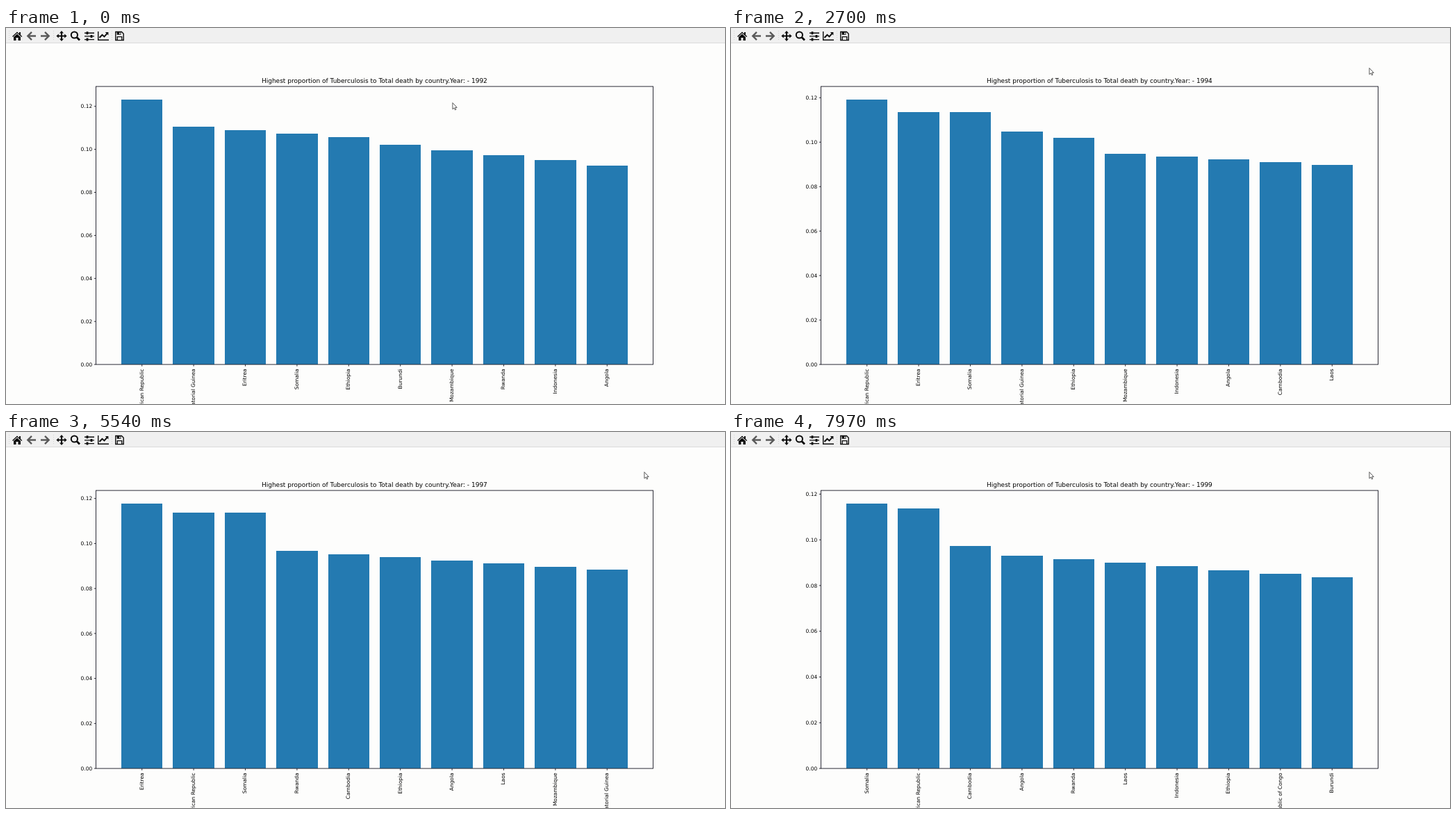
Animation of 1035 by 541 pixels, one loop 8 s. Source, as an HTML page:

```html
<!DOCTYPE html>
<html lang="en">
<head>
<meta charset="utf-8">
<title>Bar chart by year</title>
<style>
  html, body { margin: 0; width: 100%; height: 100%; overflow: hidden; background: #fdfdfc; }
  svg { display: block; width: 1035px; height: 541px; }
  text { font-family: "DejaVu Sans", sans-serif; font-size: 7.48px; fill: #000; }
  #title { font-size: 9px; text-anchor: middle; }
  #ticks text, #labels text { text-anchor: end; }
  #bars { fill: #247ab1; shape-rendering: crispEdges; }
  .axis { fill: none; stroke: #22222e; stroke-width: .95; }
  .icon { fill: #0c0c0c; }
  .line { fill: none; stroke: #0c0c0c; stroke-width: 2; }
  .thin { stroke-width: 1.4; }
  .thick { stroke-width: 2.8; }
  .grey { fill: none; stroke: #5a5a5a; stroke-width: 2.4; }
</style>
</head>
<body>
<svg viewBox="0 0 1035 541">
  <rect width="1035" height="541" fill="#fdfdfc"/>
  <rect width="1035" height="21" fill="#f0f0f0"/>
  <path d="M0 21.5H1035" stroke="#dadada"/>
  <path d="M4.5 4V19M68.5 4V19M152.5 4V19" stroke="#d2d2d2" stroke-dasharray="1 2"/>

  <!-- toolbar -->
  <path class="icon" d="M9 12L16 5.4L19 8.2V6H21V10L23.3 12L22.3 13L16 7.3L10 13Z"/>
  <path class="icon" d="M11 13L16 8.5L21 13V18H17.5V14H14.5V18H11Z"/>
  <path class="grey" d="M43 11.5H32M37 5.8L31.3 11.5L37 17.2"/>
  <path class="grey" d="M50 11.5H61M56 5.8L61.7 11.5L56 17.2"/>
  <path class="line" d="M80 7V16M75 11.5H85"/>
  <path class="icon" d="M80 4L83 7.4H77ZM80 19L83 15.6H77ZM72.4 11.5L75.8 8.5V14.5ZM87.6 11.5L84.2 8.5V14.5Z"/>
  <circle class="line" cx="98.4" cy="10" r="4.6"/>
  <path class="line thick" d="M102 13.6L106 17.6"/>
  <path class="line thin" d="M113 7.2H127M113 11.9H127M113 16.6H127"/>
  <path class="line thick" d="M117 5.2V9.2M123 9.9V13.9M117 14.6V18.6"/>
  <path class="line thin" d="M132.7 5V17.3H148"/>
  <path class="line" d="M134.5 14L138.5 9.8L141.5 12.4L146 7.4"/>
  <path class="icon" d="M142.8 6H147.4V10.6Z"/>
  <path class="line thin" d="M157.8 5.5H166.4L169.2 8.3V17.5H157.8Z"/>
  <path class="icon" d="M159.6 5.5H165.4V9.8H159.6ZM159.6 12H167.4V17.5H159.6Z"/>
  <path d="M163.1 6.4H164.5V8.9H163.1ZM160.9 13.2H166.1V17H160.9Z" fill="#f0f0f0"/>

  <!-- chart -->
  <text id="title" x="530.4" y="79.4"></text>
  <g id="bars"></g>
  <g id="ticks"></g>
  <g id="labels"></g>
  <rect class="axis" x="129.5" y="84.1" width="802" height="400"/>
  <path id="pointer" d="M0 0V9.2L2.1 7.3L3.5 10.3L4.9 9.7L3.6 6.8H6.3Z" fill="#fff" stroke="#333" stroke-width=".8"/>
</svg>
<script>
const LOOP = 8000, FIRST_CHANGE = 905, STEP = 1060;
const LEFT = 129.5, BASE = 484.1, HEIGHT = 400;
const PITCH = 802 / 10.78, BAR = PITCH * 0.8;

const NAMES = {
  A: 'Angola', B: 'Burundi', C: 'Cambodia', D: 'Democratic Republic of Congo',
  E: 'Eritrea', F: 'Central African Republic', G: 'Equatorial Guinea',
  I: 'Indonesia', L: 'Laos', M: 'Mozambique', R: 'Rwanda', S: 'Somalia', T: 'Ethiopia'
};

// Each year is a few runs of ranked countries; the share (in 0.0001)
// falls evenly from the first to the last country of a run.
const YEARS = [
  [['F', 1231], ['GEST', 1107, 1057], ['BMRIA', 1021, 925]],
  [['F', 1213], ['SEGTBMIRC', 1138, 907]],
  [['F', 1191], ['ES', 1135, 1134], ['GT', 1047, 1019], ['MIACL', 949, 897]],
  [['EFS', 1186, 1158], ['GTRACMI', 1015, 908]],
  [['EFS', 1181, 1147], ['TRGACML', 983, 903]],
  [['E', 1177], ['FS', 1137, 1137], ['RCTALMG', 967, 883]],
  [['SFE', 1160, 1129], ['CRTLAIM', 966, 857]],
  [['SF', 1158, 1137], ['C', 972], ['ARLITDB', 930, 837]]
];

const $ = id => document.getElementById(id);
const mix = (a, b, p) => a + (b - a) * p;

function add(parent, tag, attrs) {
  const el = document.createElementNS('http://www.w3.org/2000/svg', tag);
  for (const k in attrs) el.setAttribute(k, attrs[k]);
  return $(parent).appendChild(el);
}

const columns = Array.from({ length: 10 }, (_, i) => {
  const x = LEFT + (i + 0.89) * PITCH;
  add('ticks', 'path', { class: 'axis', d: `M${x} ${BASE}v2.7` });
  return {
    bar: add('bars', 'rect', { x: x - BAR / 2, width: BAR }),
    label: add('labels', 'text', { transform: `translate(${x + 1.95} 490.4) rotate(-90)` })
  };
});

const ticks = Array.from({ length: 7 }, (_, i) => {
  const mark = add('ticks', 'path', { class: 'axis' });
  const label = add('ticks', 'text', { x: 124.2 });
  label.textContent = (i * 0.02).toFixed(2);
  return { mark, label };
});

function ranking(runs) {
  return runs.flatMap(([keys, from, to]) => [...keys].map((key, i) => ({
    name: NAMES[key],
    share: i ? mix(from, to, i / (keys.length - 1)) : from
  })));
}

function showYear(n) {
  const rows = ranking(YEARS[n]);
  const scale = HEIGHT / (rows[0].share * 1.05);
  $('title').textContent =
    `Highest proportion of Tuberculosis to Total death by country.Year: - ${1992 + n}`;
  columns.forEach(({ bar, label }, i) => {
    const h = rows[i].share * scale;
    bar.setAttribute('y', BASE - h);
    bar.setAttribute('height', h);
    label.textContent = rows[i].name;
  });
  ticks.forEach(({ mark, label }, i) => {
    const y = BASE - i * 200 * scale;
    mark.setAttribute('d', `M${LEFT} ${y}h-2.7`);
    label.setAttribute('y', y + 2.7);
  });
}

function ease(t, from, to) {
  const p = Math.min(1, Math.max(0, (t - from) / (to - from)));
  return p * p * (3 - 2 * p);
}

let shown = -1;

function draw(now) {
  const t = now % LOOP;
  const n = Math.max(0, Math.floor((t - FIRST_CHANGE) / STEP) + 1);
  if (n !== shown) showYear(shown = n);
  const go = ease(t, 1600, 1950), settle = ease(t, 2500, 2700);
  const x = 642.9 + 281.2 * go - 5.2 * settle;
  const y = 107.6 - 46 * go - 4 * settle;
  $('pointer').setAttribute('transform', `translate(${x} ${y})`);
}

const start = performance.now();
function tick() {
  draw(performance.now() - start);
  requestAnimationFrame(tick);
}
tick();
</script>
</body>
</html>
```
